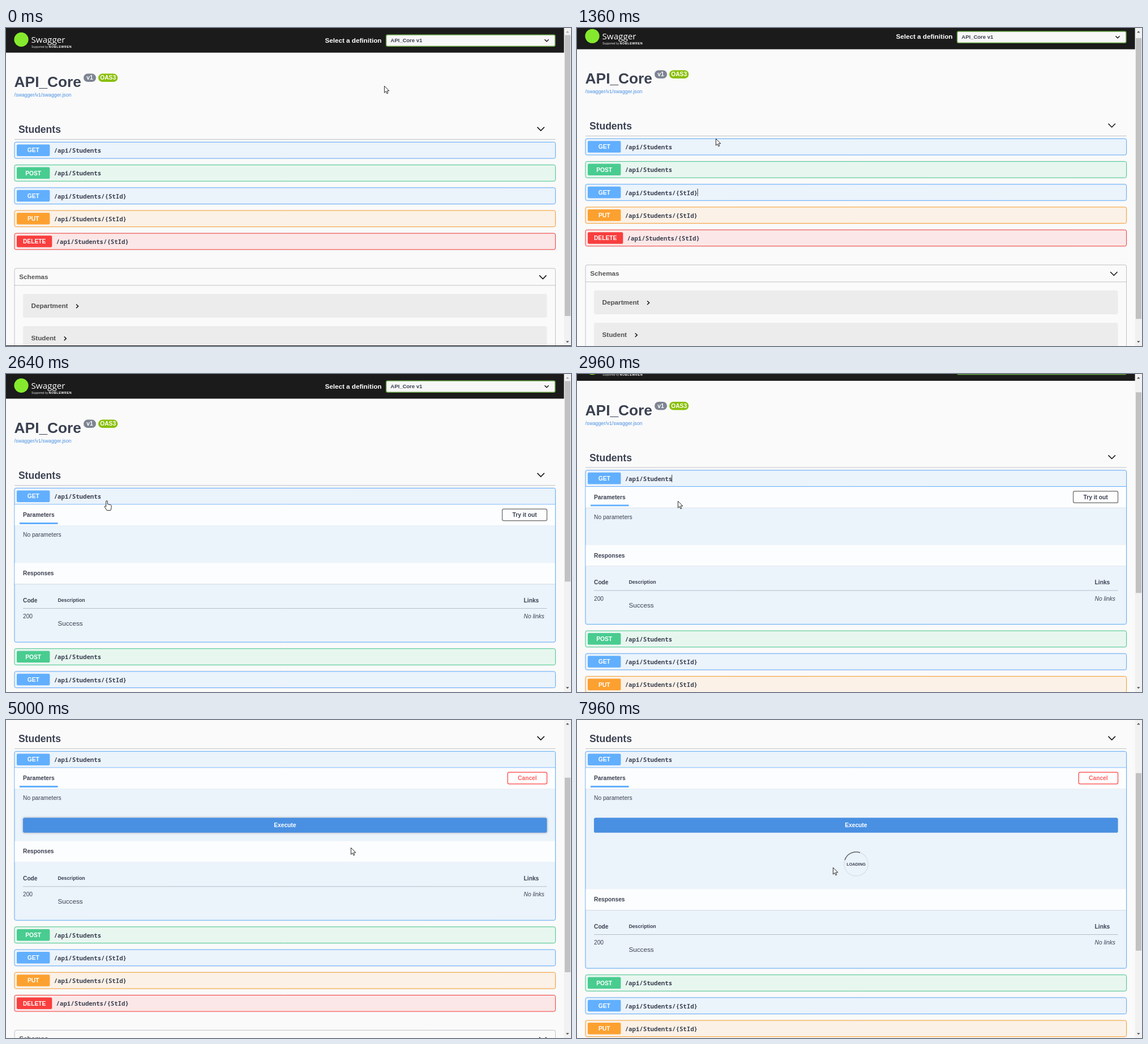
Recreate the animation shown at these times as an HTML page with a canvas. Size 998x561 px, loop 8000 ms.

```html
<!DOCTYPE html>
<html lang="en">
<head>
<meta charset="utf-8">
<title>API_Core</title>
<style>
html, body { margin: 0; height: 100%; overflow: hidden; background: #fafafa; }
canvas { display: block; }
</style>
</head>
<body>
<canvas id="stage" width="998" height="561"></canvas>
<script>
const ctx = document.getElementById('stage').getContext('2d');
const W = 998, H = 561, LOOP = 8000;
const SANS = '"Liberation Sans", Arial, sans-serif';
const MONO = '"Noto Sans Mono", monospace';
const INK = '#3b4151', RULE = 'rgba(59,65,81,.3)';
const LEFT = 15, RIGHT = 970.5, INNER = 30, INNER_RIGHT = 955.5;
const S = 8.77, M = 10.23, L = 11.69; // type sizes

const ARROW = new Path2D('M.4.4V12.2L3.1 9.6 4.9 13.8 6.8 13 5 8.9H8.8Z');
const HAND = new Path2D('M-1.3 10V.9a1.3 1.3 0 0 1 2.6 0V5.6l5 1q1.8.5 1.8 2.2v3.4l-1.3 4.4H.2L-3.5 11q-.9-1.6.4-2 .9-.2 1.8 1z');

const GET = '97,175,254', POST = '73,204,144', PUT = '252,161,48', DELETE = '249,62,62';
const OPS = [
  ['GET', GET, ''], ['POST', POST, ''], ['GET', GET, '/{StId}'],
  ['PUT', PUT, '/{StId}'], ['DELETE', DELETE, '/{StId}'],
];

// [time, x, y]
const POINTER = [
  [400, 668, 102], [1000, 245, 195], [1400, 245, 195], [1700, 174, 224],
  [2520, 174, 224], [2640, 178, 224], [3080, 178, 224], [3640, 936, 111],
  [3700, 936, 111], [3840, 930, 106], [4240, 930, 106], [5000, 609, 225],
  [5080, 609, 225], [5320, 505, 188], [5440, 505, 188], [5680, 444, 246],
  [7460, 444, 246], [7960, 452, 260],
];
const SCROLL = [[560, 0], [860, 46], [949, 46], [1481, 0], [2840, 0], [3240, 146]];
const HAND_TIMES = [[1560, 2900], [3560, 4320], [4640, 4840], [5160, 5520]];
const PRESS_TIMES = [[1840, 2120], [4000, 4240], [5320, 5560]];
const OPEN_AT = 1960, TRY_AT = 4120, LOAD_AT = 5440;

const within = (t, spans) => spans.some(([a, b]) => t >= a && t < b);

function tween(keys, t) {
  const i = keys.findIndex(k => k[0] > t);
  if (i === 0) return keys[0].slice(1);
  if (i < 0) return keys[keys.length - 1].slice(1);
  const a = keys[i - 1], b = keys[i], u = (t - a[0]) / (b[0] - a[0]);
  const e = u * u * (3 - 2 * u);
  return a.slice(1).map((v, n) => v + (b[n + 1] - v) * e);
}

// y is the middle of the capital letters
function text(str, x, y, size, { color = INK, style = 'bold', font = SANS, align = 'left', spacing = 0 } = {}) {
  ctx.font = `${style} ${size}px ${font}`;
  ctx.fillStyle = color;
  ctx.textAlign = align;
  ctx.letterSpacing = spacing + 'px';
  ctx.fillText(str, x, y + size * .36);
}

function rect(x, y, w, h, fill, { radius = 0, stroke, line = 1, shadow, blur = 0, dy = 0 } = {}) {
  ctx.beginPath();
  ctx.roundRect(x, y, w, h, radius);
  if (shadow) {
    ctx.shadowColor = shadow;
    ctx.shadowBlur = blur;
    ctx.shadowOffsetY = dy;
  }
  if (fill) { ctx.fillStyle = fill; ctx.fill(); }
  ctx.shadowColor = 'transparent';
  if (stroke) { ctx.strokeStyle = stroke; ctx.lineWidth = line; ctx.stroke(); }
}

function polyline(points, color, width) {
  ctx.beginPath();
  points.forEach(p => ctx.lineTo(...p));
  ctx.strokeStyle = color;
  ctx.lineWidth = width;
  ctx.stroke();
}

const rule = (x1, x2, y, color = RULE) => polyline([[x1, y], [x2, y]], color, 1);
const chevronDown = (x, y, r, width = 1.5) =>
  polyline([[x - r, y - r / 2], [x, y + r / 2], [x + r, y - r / 2]], '#111', width);
const chevronRight = (x, y) => polyline([[x - 2, y - 3.3], [x + 1.6, y], [x - 2, y + 3.3]], '#111', 1.5);

function dot(x, y, r, color) {
  ctx.beginPath();
  ctx.arc(x, y, r, 0, 2 * Math.PI);
  ctx.fillStyle = color;
  ctx.fill();
}

function topBar() {
  rect(0, 0, W, 43.6, '#1b1b1b');
  dot(27, 20.3, 12.6, '#85ea2d');
  text('Swagger', 44.5, 20.3, 15.2, { color: '#fff', style: 'normal', font: '"Open Sans", sans-serif' });
  text('Supported by', 45, 33, 4.9, { color: '#ddd', style: 'normal' });
  text('NOBLEWREN', 75.5, 33, 5.4, { color: '#fff', spacing: .6 });
  text('Select a definition', 563.4, 21.3, L, { color: '#fff' });
  rect(671.5, 12, 298.5, 20.3, '#f7f7f7', { radius: 2.5, stroke: '#62a03f', line: 1.5 });
  text('API_Core v1', 679.3, 22, 9.5);
  chevronDown(955, 22, 3.6, 1.4);
}

function heading(hover) {
  text('API_Core', 14.6, 95, 26.3);
  rect(137, 80.5, 22, 14.6, '#7d8492', { radius: 7.3 });
  text('v1', 148, 87.8, M, { color: '#fff', align: 'center' });
  rect(163, 80.5, 34.3, 14.6, '#89bf04', { radius: 7.3 });
  text('OAS3', 180.2, 87.8, M, { color: '#fff', align: 'center' });
  text('/swagger/v1/swagger.json', 14.6, 118, S, { color: '#4990e2', style: 'normal' });
  if (hover) rect(LEFT, 161, RIGHT - LEFT, 35.5, 'rgba(0,0,0,.02)');
  text('Students', 21.9, 178.8, 17.54);
  chevronDown(944.7, 178, 6.2);
  rule(LEFT, RIGHT, 196.5);
}

function operation([verb, rgb, suffix], y, height) {
  const width = verb === 'DELETE' ? 62.3 : 58.4;
  const color = `rgb(${rgb})`;
  rect(LEFT, y, RIGHT - LEFT, height, '#fafafa', { radius: 2.9, shadow: 'rgba(0,0,0,.19)', blur: 2.2 });
  rect(LEFT, y, RIGHT - LEFT, height, `rgba(${rgb},.1)`, { radius: 2.9, stroke: color });
  rect(19, y + 4, width, 20.5, color, { radius: 2.2 });
  text(verb, 19 + width / 2, y + 14.4, M, { color: '#fff', align: 'center' });
  text('/api/Students' + suffix, 26.3 + width, y + 15, 10.7, { font: MONO });
}

function sectionHead(title, y) {
  rect(LEFT + .5, y, RIGHT - LEFT - 1, 36.8, '#fcfdfe', { shadow: 'rgba(0,0,0,.12)', blur: 1.5, dy: .8 });
  text(title, INNER, y + 18.2, M);
}

function outlineButton(label, x, color, textColor, hover) {
  const w = INNER_RIGHT - x;
  rect(x, 238.2, w, 20.6, '#fdfdfe', {
    radius: 2.5, stroke: color, line: 1.5,
    shadow: hover ? 'rgba(0,0,0,.4)' : 'rgba(0,0,0,.1)', blur: hover ? 4 : 1.5,
  });
  text(label, x + w / 2, 248.6, M, { color: textColor, align: 'center' });
}

function loader(t) {
  const x = 493, y = 400, turn = (t - 7032) / 1000 * 2 * Math.PI;
  const arc = (from, to, color) => {
    ctx.beginPath();
    ctx.arc(x, y, 21.2, from, to);
    ctx.strokeStyle = color;
    ctx.lineWidth = 1.5;
    ctx.stroke();
  };
  ctx.globalAlpha = Math.min(1, (t - LOAD_AT + 40) / 500);
  arc(turn - Math.PI / 4, turn + Math.PI * 5 / 4, 'rgba(85,85,85,.1)');
  arc(turn - Math.PI * 3 / 4, turn - Math.PI / 4, 'rgba(0,0,0,.6)');
  text('LOADING', x, y + .3, 7.3, { align: 'center' });
  ctx.globalAlpha = 1;
}

function details(t, shift) {
  rule(LEFT, RIGHT, 230, `rgb(${GET})`);
  sectionHead('Parameters', 230.5);
  rect(24, 262, 67.5, 2.9, `rgb(${GET})`);
  text('No parameters', INNER, 283.6, M, { style: 'normal' });
  if (t < TRY_AT) {
    outlineButton('Try it out', 876.6, '#808080', INK, t >= 3600);
  } else {
    outlineButton('Cancel', 886.2, '#ff6060', '#ff6060', t < 4320);
    const hover = t >= 4600 && t < LOAD_AT;
    rect(INNER, 318.5, INNER_RIGHT - INNER, 26.3, '#4990e2', {
      radius: 2.9, shadow: hover ? 'rgba(0,0,0,.3)' : 'rgba(0,0,0,.1)', blur: hover ? 4 : 1.5,
    });
    text('Execute', 492.8, 331.7, M, { color: '#fff', align: 'center' });
  }
  if (t >= LOAD_AT) loader(t);

  ctx.save();
  ctx.translate(0, shift);
  sectionHead('Responses', 333.3);
  text('Code', INNER, 399, M);
  text('Description', 91.4, 398.8, S);
  text('Links', 914.6, 399, M);
  rule(INNER, INNER_RIGHT, 413.5);
  text('200', INNER, 427.5, M, { style: 'normal' });
  text('Success', 91.4, 439.4, L, { style: 'normal' });
  text('No links', 914.6, 427.5, M, { style: 'italic' });
  ctx.restore();
}

function schemas() {
  rect(LEFT, 424, RIGHT - LEFT, 159.3, null, { radius: 2.9, stroke: RULE });
  text('Schemas', 23.2, 438.8, L, { color: '#555' });
  chevronDown(948.3, 439.5, 6.2);
  rule(LEFT, RIGHT, 454);
  [['Department', 126], ['Student', 104.7]].forEach(([name, x], i) => {
    const y = 469 + i * 57;
    rect(INNER, y, INNER_RIGHT - INNER, 42, 'rgba(0,0,0,.055)', { radius: 2.9 });
    text(name, 44.5, y + 21, L, { color: '#505050' });
    chevronRight(x, y + 21.8);
  });
}

function scrollbar(scroll, pageHeight) {
  const size = 12.4, ratio = (H - 2 * size) / pageHeight;
  rect(W - size, 0, size, H, '#f1f1f1');
  rect(987, size + scroll * ratio, 10, H * ratio, '#c1c1c1');
  const triangle = (y, d, color) => {
    ctx.beginPath();
    ctx.moveTo(989, y + d);
    ctx.lineTo(994.6, y + d);
    ctx.lineTo(991.8, y - d);
    ctx.fillStyle = color;
    ctx.fill();
  };
  triangle(6.8, 1.5, scroll > 0 ? '#505050' : '#a3a3a3');
  triangle(553.7, -1.5, '#505050');
}

function pointer(t) {
  const [x, y] = tween(POINTER, t);
  if (within(t, PRESS_TIMES)) dot(x, y - 1, 8.5, 'rgba(255,236,0,.62)');
  const shape = within(t, HAND_TIMES) ? HAND : ARROW;
  ctx.save();
  ctx.translate(x, y);
  ctx.lineJoin = 'round';
  ctx.fillStyle = '#fff';
  ctx.fill(shape);
  ctx.strokeStyle = '#111';
  ctx.lineWidth = .9;
  ctx.stroke(shape);
  ctx.restore();
}

function draw(t) {
  const [scroll] = tween(SCROLL, t);
  const open = t >= OPEN_AT;
  const shift = (t >= TRY_AT ? 26.3 : 0) + (t >= LOAD_AT ? 84.7 : 0);
  const extra = open ? 243 + shift : 0;

  rect(0, 0, W, H, '#fafafa');
  ctx.save();
  ctx.translate(0, -scroll);
  topBar();
  heading(t >= 760 && t < 1240);
  OPS.forEach((op, i) => operation(op, 201.4 + i * 40.2 + (i && extra), 28.6 + (i ? 0 : extra)));
  if (open) details(t, shift);
  if (within(t, [[80, 580], [1080, 1600]])) rect(212.6, 289.5, .9, 13, '#222');
  if (within(t, [[1840, 2360], [2840, 3360]])) rect(167.2, 209.3, .9, 13, '#222');
  ctx.translate(0, extra);
  schemas();
  ctx.restore();

  scrollbar(scroll, 607 + extra);
  pointer(t);
  if (t < 80) rect(0, 560, W, 1, '#111');
}

function tick() {
  const t = performance.now() % LOOP;
  draw(Math.floor(t / 40) * 40);
  requestAnimationFrame(tick);
}
tick();
</script>
</body>
</html>
```
